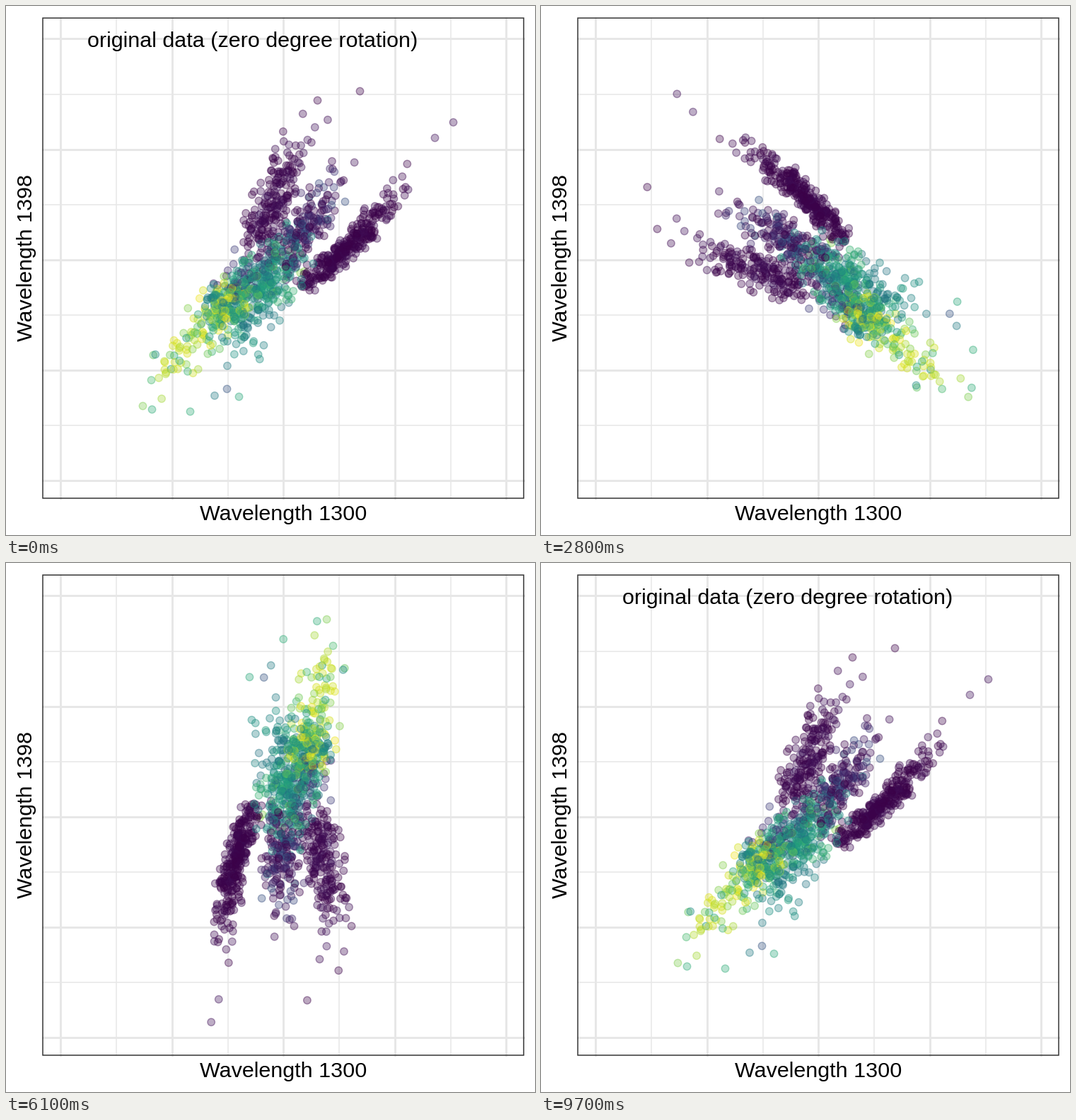
A matplotlib script that plays this animation: 748x748 px, repeating every 10000 ms.

```python
import numpy as np
import matplotlib.pyplot as plt
from matplotlib.animation import FuncAnimation

SIZE = 748
PX = 0.72                      # points per pixel at 100 dpi
CX, CY, ASPECT = 392, 358.5, 1.008
GRID = 157.5                   # spacing of the major grid lines
rng = np.random.default_rng(4)

plt.rcParams["font.family"] = "Liberation Sans"
fig = plt.figure(figsize=(SIZE / 100, SIZE / 100), dpi=100, facecolor="white")
ax = fig.add_axes([0, 0, 1, 1])
ax.set_xlim(-0.5, SIZE - 0.5)
ax.set_ylim(SIZE - 0.5, -0.5)
ax.axis("off")


def draw_grid():
    for k in range(-4, 5):
        width = 1.5 if k % 2 else 3
        style = dict(color="#e7e7e7", lw=width * PX, zorder=1)
        x = CX + k * GRID / 2
        y = CY + k * GRID / ASPECT / 2
        ax.plot([x, x], [16, 696], **style)
        ax.plot([52, 732], [y, y], **style)


def cluster(n, x, y, tilt, along, across, start, end, bend=0.0):
    """Tilted cloud with a longer tail ahead: columns x, y, colour value."""
    e, w = rng.uniform(-1, 1, (2, 3, n)).sum(1)
    u = along * (e + 0.12 * e * e)
    w = across * w + bend * u * u
    c, s = np.cos(np.radians(tilt)), np.sin(np.radians(tilt))
    value = start + (end - start) * rng.random(n) ** 2
    return np.column_stack([x + u * c - w * s, y - u * s - w * c, value])


points = np.vstack([
    # three dark arms
    cluster(310, 476, 347, 43, 46, 8, 0.0, 0.04, bend=0.0008),
    cluster(195, 374, 282, 67, 45, 12, 0.0, 0.06),
    cluster(170, 420, 316, 56, 40, 12, 0.0, 0.30),
    # mixed body
    cluster(45, 340, 374, 52, 30, 16, 0.05, 0.35),
    cluster(230, 350, 400, 50, 42, 20, 0.42, 0.72),
    cluster(85, 378, 384, 50, 28, 18, 0.50, 0.82),
    cluster(60, 303, 428, 50, 24, 16, 0.48, 0.70),
    # yellow lower end and loose fringe
    cluster(105, 302, 431, 230, 28, 15, 0.98, 0.72),
    cluster(40, 250, 488, 230, 28, 13, 0.95, 0.50),
    cluster(30, 342, 462, 235, 34, 17, 0.45, 0.65),
    # outermost points
    [(632, 164, .04), (606, 186, .05), (500, 120, 0), (440, 133, 0),
     (206, 570, .65), (260, 573, .65), (329, 552, .63), (312, 541, .28)],
])
rng.shuffle(points)
dx, dy = points[:, 0] - CX, (CY - points[:, 1]) * ASPECT

fill = plt.cm.viridis(points[:, 2])
fill[:, :3] *= 0.86 + 0.14 * points[:, 2:]
edge = fill.copy()
fill[:, 3], edge[:, 3] = 0.34, 0.42

# (frame, degrees): nearly steady turn that rests at 135 and 316
KEYS = [(8, 0), (19, 51), (37, 131), (41, 135), (45, 135), (52, 167),
        (69, 251), (78, 305), (83, 316.3), (85, 316.3), (95, 360)]
KEY_FRAME, KEY_ANGLE = zip(*KEYS)


def rotated(frame):
    a = np.radians(np.interp(frame, KEY_FRAME, KEY_ANGLE))
    c, s = np.cos(a), np.sin(a)
    return np.column_stack([CX + dx * c - dy * s,
                            CY - (dx * s + dy * c) / ASPECT])


def caption(frame):
    if frame <= 8 or frame >= 95:
        return 348, "original data (zero degree rotation)"
    if 41 <= frame <= 45:
        return 353, "maximum variance (135 degree rotation)"
    if 83 <= frame <= 85:
        return 353, "maximum variance (315 degree rotation)"
    return 348, ""


draw_grid()
dots = ax.scatter(dx, dy, s=(10.4 * PX) ** 2, facecolors=fill,
                  edgecolors=edge, linewidths=1.4 * PX, zorder=2)
ax.add_patch(plt.Rectangle((52, 16), 680, 680, fill=False, ec="#333333",
                           lw=1.5 * PX, zorder=4))

font = dict(fontsize=30.5 * PX, color="black", ha="center", va="baseline")
ax.text(392, 727, "Wavelength 1300", **font)
ax.text(37, 356, "Wavelength 1398", rotation=90, rotation_mode="anchor",
        **font)
title = ax.text(348, 58, "", zorder=3, **font)


def update(frame):
    dots.set_offsets(rotated(frame))
    x, label = caption(frame)
    title.set_x(x)
    title.set_text(label)
    return dots, title


anim = FuncAnimation(fig, update, frames=100, interval=100, repeat=True,
                     repeat_delay=0, blit=False)
plt.show()
```
